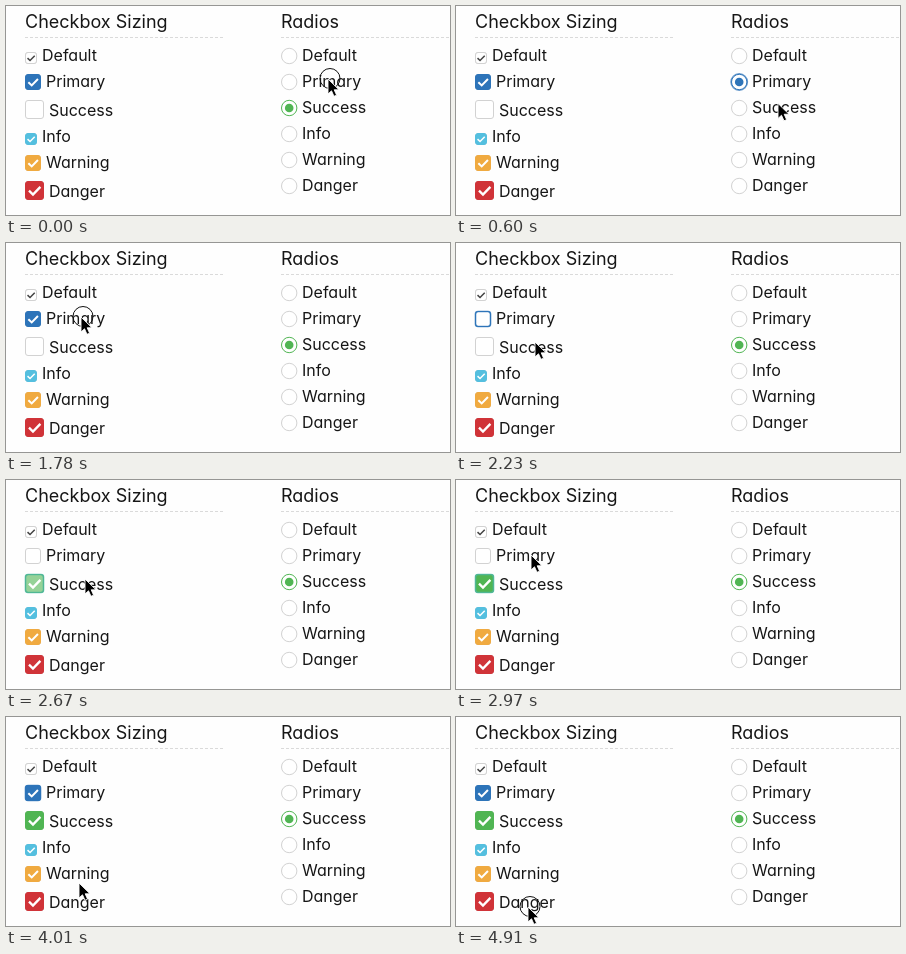
Write an HTML page that moves like this. It is 444 by 209 pixels and loops after 5.01 s.

```html
<!DOCTYPE html>
<html lang="en">
<head>
<meta charset="utf-8">
<title>Checkbox and radio styles</title>
<style>
html, body { margin: 0; width: 100%; height: 100%; overflow: hidden; background: #fefefe; }
svg { display: block; width: 444px; height: 209px; }
text { font: 400 16px Inter, Lato, sans-serif; font-feature-settings: "cv11"; fill: #161616; }
.head { font-size: 18px; }
</style>
</head>
<body>
<svg id="stage" viewBox="0 0 444 209"></svg>
<script>
const LOOP = 5010, TICK = 148.3;
const stage = document.getElementById('stage');
const GREY = '#d2d2d2', BLUE = '#2d74b9', GREEN = '#50b553', TEAL = '#4fb8a5';
const ROW = 26;

function set(el, attrs) {
  for (const key in attrs) el.setAttribute(key, attrs[key]);
}
function add(tag, attrs) {
  const el = document.createElementNS('http://www.w3.org/2000/svg', tag);
  set(el, attrs);
  return stage.appendChild(el);
}
function label(x, y, str, cls = '') {
  add('text', { x, y, class: cls }).textContent = str;
}

function heading(x, end, str) {
  label(x, 22, str, 'head');
  add('path', { d: `M${x} 31.5H${end}`, stroke: '#dadada', 'stroke-dasharray': '3 2' });
}

function checkbox(y, size, color, str, baseline) {
  const x = 19;
  const at = { x: x + .5, y: y + .5, width: size - 1, height: size - 1, rx: 2.5 };
  const base = add('rect', { ...at, fill: '#fff', stroke: GREY });
  const fill = add('rect', { ...at, fill: color || '#fff', stroke: color || GREY });
  const glow = add('rect', { ...at, fill: 'none', 'stroke-width': 1.6, opacity: 0,
    stroke: color === GREEN ? TEAL : color });
  const p = (u, v) => `${x + size * u} ${y + size * v}`;
  const mark = add('path', { d: `M${p(.21, .51)}L${p(.42, .71)}L${p(.81, .31)}`, fill: 'none',
    stroke: color ? '#fff' : '#444', 'stroke-width': size * .125 });
  label(x + size + 5, baseline, str);
  return (on, focus) => {
    set(fill, { opacity: on });
    set(mark, { opacity: on ? 1 : 0 });
    set(base, { stroke: focus ? color : GREY });
    set(glow, { opacity: focus ? .8 : 0 });
  };
}

function radio(row, color, str) {
  const cy = 50 + ROW * row;
  const at = { cx: 283.2, cy, fill: 'none' };
  const glow = add('circle', { ...at, r: 8.2, 'stroke-width': 1.5, opacity: 0,
    stroke: color === GREEN ? TEAL : color });
  const rim = add('circle', { ...at, r: 7.7, fill: '#fff', stroke: GREY });
  const dot = add('circle', { ...at, r: 0, fill: color });
  label(296, cy + 5, str);
  return (on, focus) => {
    set(dot, { r: 4.3 * on });
    set(rim, { stroke: on || focus ? color : GREY });
    set(glow, { opacity: focus ? .7 : 0 });
  };
}

heading(19, 219, 'Checkbox Sizing');
heading(275, 444, 'Radios');

checkbox(46, 12, '', 'Default', 55);
const primaryBox = checkbox(68, 16, BLUE, 'Primary', 81);
const successBox = checkbox(94, 19, GREEN, 'Success', 110);
checkbox(127, 12, '#54bfdf', 'Info', 136);
checkbox(149, 16, '#f0aa40', 'Warning', 162);
checkbox(175, 19, '#d03338', 'Danger', 191);

const [, primaryRadio, successRadio] =
  ['Default', 'Primary', 'Success', 'Info', 'Warning', 'Danger']
    .map((str, row) => radio(row, { Primary: BLUE, Success: GREEN }[str] || '#555', str));

const ring = add('circle', { r: 10, fill: 'none', stroke: '#111' });
const pointer = add('path', {
  d: 'M0 0V15L3.5 11.8L6 17.3L8.6 16.2L6.2 10.8H11Z',
  fill: '#000', stroke: '#fff', 'stroke-width': .9, 'stroke-linejoin': 'round'
});

// Times are in ticks: the pointer rests from arrive to leave, and may click there.
const stops = [
  { x: 322, y: 73, arrive: 0, leave: 2, click: 0, hit: primaryRadio },
  { x: 322, y: 106, arrive: 5, leave: 8, click: 6, hit: successRadio },
  { x: 75, y: 74, arrive: 11, leave: 13, click: 12, hit: primaryBox },
  { x: 79, y: 99, arrive: 15, leave: 18, click: 17, hit: successBox },
  { x: 75, y: 75, arrive: 20, leave: 24, click: 22.6, hit: primaryBox },
  { x: 73, y: 166, arrive: 27, leave: 28 },
  { x: 72, y: 190, arrive: 30, leave: 34, click: 33 }
];
const clicks = stops.filter(s => 'click' in s);
const radios = [primaryRadio, successRadio];

const clamp = v => Math.min(1, Math.max(0, v));
const ease = p => p * p * (3 - 2 * p);

function pointerAt(tick) {
  const i = stops.findLastIndex(s => s.arrive <= tick);
  const a = stops[i], b = stops[i + 1] || a;
  const p = ease(clamp((tick - a.leave) / (b.arrive - a.leave)));
  const bow = .12 * Math.abs(b.x - a.x) * Math.sin(Math.PI * p);
  return { x: a.x + (b.x - a.x) * p, y: a.y + (b.y - a.y) * p - bow };
}

// A click fades its control over two ticks; the radios share one choice.
function valueOf(control, initial, tick) {
  const isRadio = radios.includes(control);
  let on = initial;
  for (const { click, hit } of clicks) {
    if (click >= tick) break;
    const p = clamp(tick - click - .4);
    if (hit === control) on = isRadio ? p : on + (1 - 2 * on) * p;
    else if (isRadio && radios.includes(hit)) on = 0;
  }
  return on;
}

function draw(t) {
  const tick = Math.floor(t / TICK);
  const { x, y } = pointerAt(tick);
  const last = clicks.findLast(c => Math.floor(c.click) <= tick);
  const age = tick - last.click;
  const show = (control, initial) =>
    control(valueOf(control, initial, tick), last.hit === control && age > 0 && age < 8);

  set(pointer, { transform: `translate(${x} ${y})` });
  set(ring, { cx: x + 2, cy: y - .5, opacity: Math.floor(last.click) === tick ? 1 : 0 });
  show(primaryRadio, 0);
  show(successRadio, 1);
  show(primaryBox, 1);
  show(successBox, 0);
}

const start = performance.now();
function frame(now) {
  draw(Math.max(0, now - start) % LOOP);
  requestAnimationFrame(frame);
}
draw(0);
requestAnimationFrame(frame);
</script>
</body>
</html>
```
